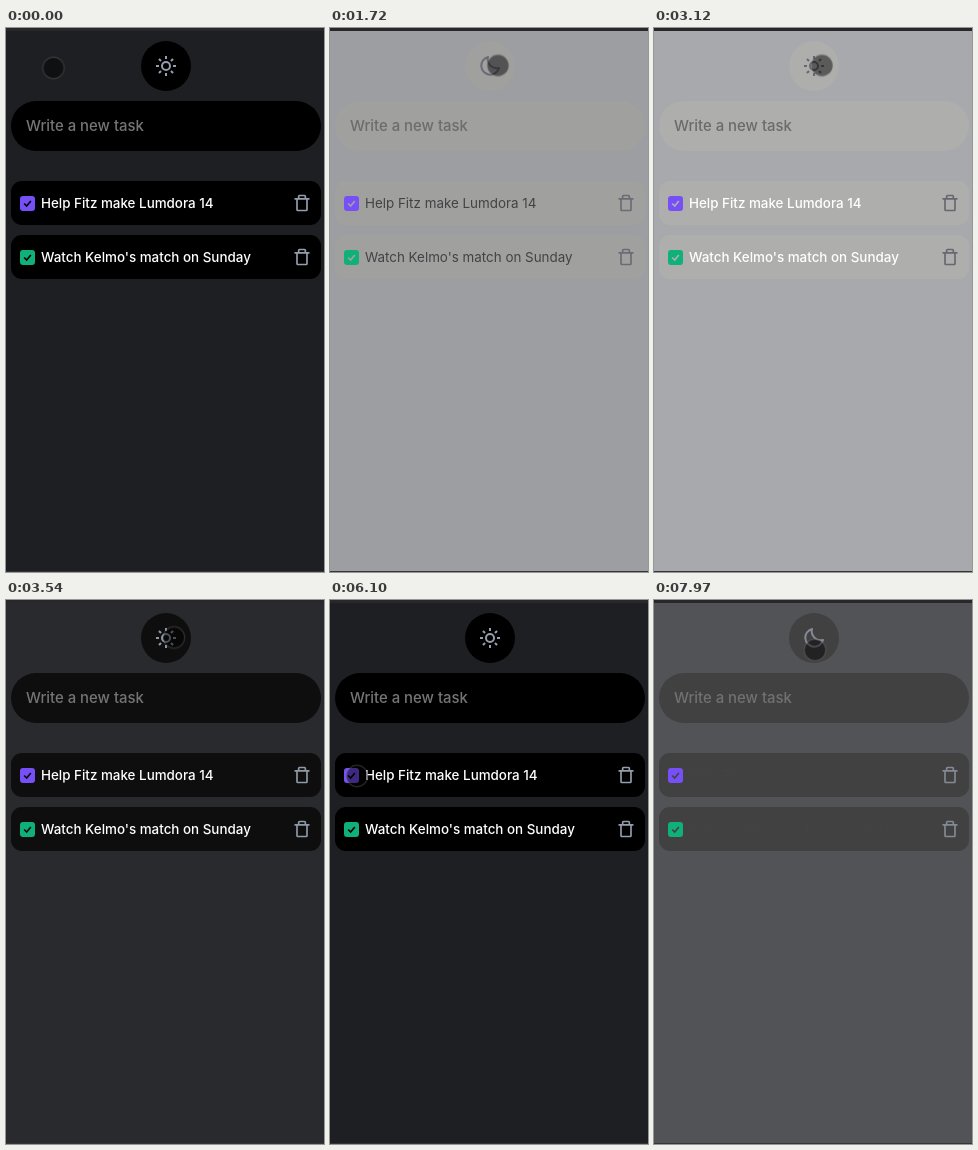
An HTML page for the animation above (7990 ms loop, 318 px wide and 544 px high).

```html
<!DOCTYPE html>
<html lang="en">
<head>
<meta charset="utf-8">
<title>Task list</title>
<style>
  html, body { margin: 0; width: 100%; height: 100%; overflow: hidden; background: #1e1f22; }
  svg { display: block; width: 318px; height: 544px; }
  text { font-family: Inter, "Open Sans", sans-serif; font-weight: 500; font-size: 13.4px; }
  .hint { font-size: 14.9px; }
  .icon, .check { fill: none; stroke-width: 2; }
</style>
</head>
<body>
<svg viewBox="0 0 318 544">
  <defs>
    <path id="trash" d="M3 7H21M6 7V20a1 1 0 0 0 1 1H17a1 1 0 0 0 1-1V7M8 7V4a1 1 0 0 1 1-1h6a1 1 0 0 1 1 1V7"/>
    <path id="tick" d="M8 12l3 3 5-6"/>
  </defs>

  <rect class="page" width="318" height="544"/>
  <rect width="318" height="3" fill="#29272a"/>
  <rect y="543" width="318" height="1" fill="#353536"/>

  <circle class="card" cx="160" cy="38" r="25"/>
  <g transform="translate(148 26)">
    <g class="icon sun">
      <circle cx="12" cy="12" r="4"/>
      <g id="rays"></g>
    </g>
    <path class="icon moon" stroke-linejoin="round" d="M10 3A9 9 0 1 0 21 14A9 9 0 0 1 10 3Z"/>
  </g>

  <rect class="card" x="5" y="73" width="310" height="50" rx="25"/>
  <text class="hint" x="20" y="103">Write a new task</text>

  <g>
    <rect class="card" x="5" y="153" width="310" height="44" rx="11"/>
    <rect x="14" y="168" width="15" height="15" rx="3" fill="#7650f6"/>
    <g transform="translate(11.5 165.5) scale(.833)"><use class="check" href="#tick"/></g>
    <text class="label" x="35" y="180">Help Fitz make Lumdora 14</text>
    <g transform="translate(286 165) scale(.833)"><use class="icon" href="#trash"/></g>
  </g>
  <g transform="translate(0 54)">
    <rect class="card" x="5" y="153" width="310" height="44" rx="11"/>
    <rect x="14" y="168" width="15" height="15" rx="3" fill="#0fb07a"/>
    <g transform="translate(11.5 165.5) scale(.833)"><use class="check" href="#tick"/></g>
    <text class="label" x="35" y="180">Watch Kelmo's match on Sunday</text>
    <g transform="translate(286 165) scale(.833)"><use class="icon" href="#trash"/></g>
  </g>

  <circle class="pointer" r="10.7" stroke="rgba(128,128,128,.27)" stroke-width="1.4"/>
</svg>
<script>
const LOOP = 7990;
const TO_LIGHT = 1380, TO_DARK = 2988, TO_LIGHT_AGAIN = 7805, FADE = 800;
const start = document.timeline.currentTime || 0;

document.getElementById('rays').innerHTML = Array.from({ length: 8 }, (_, i) =>
  `<path d="M12 2v3" transform="rotate(${i * 45} 12 12)"/>`).join('');

// steps: [ms, value, easing towards the next step]
function play(selector, prop, steps) {
  const frames = steps.map(([ms, value, easing = 'linear']) =>
    ({ offset: ms / LOOP, [prop]: value, easing }));
  for (const el of document.querySelectorAll(selector)) {
    el.animate(frames, { duration: LOOP, iterations: Infinity }).startTime = start;
  }
}

function fade(selector, prop, dark, light) {
  const rgb = k => `rgb(${dark.map((v, i) => v + (light[i] - v) * k)})`;
  play(selector, prop, [
    [0, rgb(0)], [TO_LIGHT, rgb(0), 'ease'], [TO_LIGHT + FADE, rgb(1)],
    [TO_DARK, rgb(1), 'ease'], [TO_DARK + FADE, rgb(0)],
    [TO_LIGHT_AGAIN, rgb(0), 'ease-in'], [LOOP, rgb(.35)]
  ]);
}

function swap(selector, prop, dark, light) {
  const hold = 'step-end';
  play(selector, prop, [
    [0, dark, hold], [TO_LIGHT, light, hold], [TO_DARK, dark, hold],
    [TO_LIGHT_AGAIN, light, hold], [LOOP, light]
  ]);
}

fade('.page', 'fill', [30, 31, 34], [207, 208, 211]);
fade('.card', 'fill', [0, 0, 0], [223, 223, 222]);
fade('.check', 'stroke', [0, 0, 0], [226, 226, 226]);
fade('.icon', 'stroke', [148, 158, 172], [90, 88, 95]);
fade('.hint', 'fill', [117, 117, 117], [104, 104, 104]);
swap('.label', 'fill', '#fff', '#434345');
swap('.label', 'fontWeight', 500, 400);
swap('.sun', 'opacity', 1, 0);
swap('.moon', 'opacity', 0, 1);

const at = (x, y) => `translate(${x}px, ${y}px)`;
const rest = at(47.5, 40), toggle = at(168, 37.5), box = at(27, 176);
const nudged = at(29, 173), lower = at(161, 50);
const glide = 'cubic-bezier(.165,.84,.44,1)', dash = 'cubic-bezier(.19,.94,.22,1)';
play('.pointer', 'transform', [
  [0, rest], [560, rest, 'ease-out'], [910, toggle],
  [4300, toggle, glide], [4890, box],
  [6100, box, 'ease-in-out'], [6890, nudged],
  [6910, nudged, dash], [7520, lower], [LOOP, lower]
]);

const shade = 'rgba(0,0,0,.48)', clear = 'rgba(0,0,0,0)', flash = 'rgba(255,255,0,.5)';
play('.pointer', 'fill', [
  [0, shade, 'step-end'],
  [1260, flash, 'step-end'], [1360, shade, 'step-end'],
  [2840, flash, 'step-end'], [2940, shade, 'step-end'],
  [4300, shade], [4400, clear, 'step-end'],
  [5170, flash, 'step-end'], [5260, shade, 'step-end'],
  [6100, shade], [6890, clear, 'step-end'],
  [7700, flash, 'step-end'], [7800, shade, 'step-end'], [LOOP, shade]
]);
</script>
</body>
</html>
```
